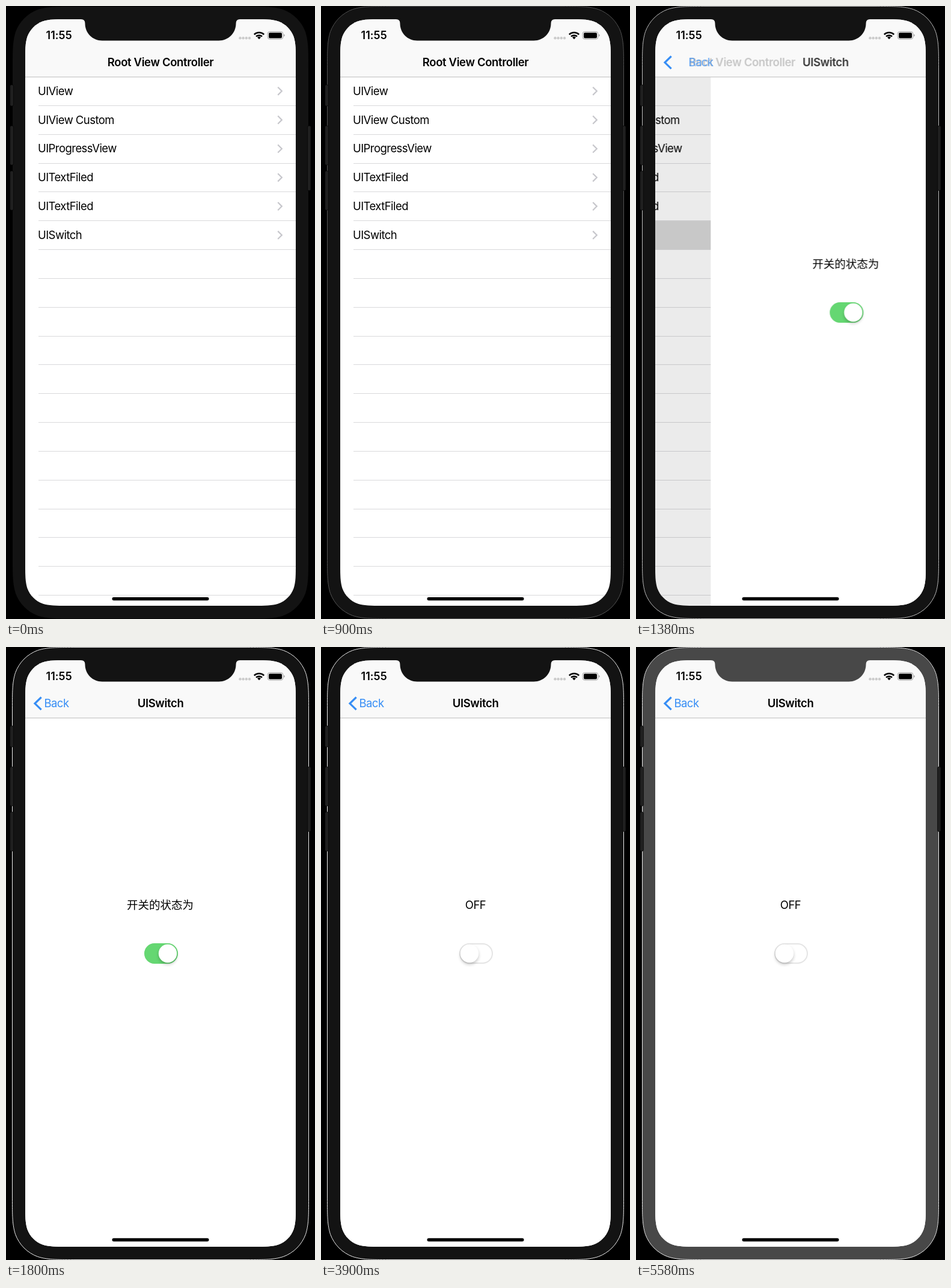
An HTML page for the animation above (5640 ms loop, 514 by 1018 pixels).

```html
<!DOCTYPE html>
<html lang="en">
<head>
<meta charset="utf-8">
<title>Switch demo</title>
<style>
  html, body { margin: 0; width: 100%; height: 100%; overflow: hidden; background: #000; }
  svg { display: block; width: 100vw; height: 100vh; }
  text { font: 18.5px Inter, Roboto, sans-serif; letter-spacing: -.56px; }
  .bold { font-weight: 600; letter-spacing: -.36px; }
  .mid { text-anchor: middle; }
  .clock { font-size: 18px; font-weight: 600; letter-spacing: .05px; }
  .cjk { font-family: "Noto Sans CJK SC", "Noto Sans CJK", sans-serif; letter-spacing: 0; }
  .blue { fill: #368df5; }
  .line { fill: none; stroke-linecap: square; }

  .anim { animation: 5.64s infinite both; }
  .step { animation-timing-function: step-end; }
  .push { animation-timing-function: cubic-bezier(.3, .6, .3, 1); }

  .bezel { animation-name: bezel; }
  .rim { animation-name: rim; animation-timing-function: linear; }
  .press { animation-name: press; }
  .list { animation-name: list; }
  .dim { animation-name: dim; }
  .page { animation-name: page; }
  .oldTitle { animation-name: oldTitle; }
  .newTitle { animation-name: newTitle; }
  .back { animation-name: back; }
  .arrow { animation-name: arrow; }
  .first { animation-name: first; }
  .on { animation-name: on; }
  .off { animation-name: off; }
  .fill { animation-name: fill; }
  .knob { animation-name: knob; filter: drop-shadow(0 3px 2.5px rgba(0, 0, 0, .22)); }

  @keyframes bezel { 0% { fill: #131313 } 97.87%, 100% { fill: #484848 } }
  @keyframes rim {
    0% { opacity: 0 } 15.96% { opacity: .35 } 24.47% { opacity: .8 } 31.9%, 100% { opacity: 1 }
  }
  @keyframes press { 0% { opacity: 0 } 19.15%, 100% { opacity: 1 } }

  /* page push: 1178 to 1678 ms */
  @keyframes list {
    0%, 20.88% { transform: none } 29.75%, 100% { transform: translateX(-135px) }
  }
  @keyframes dim { 0%, 20.88% { opacity: 0 } 29.75%, 100% { opacity: .1 } }
  @keyframes page {
    0%, 20.88% { transform: translateX(450px) } 29.75%, 100% { transform: none }
  }
  @keyframes oldTitle {
    0%, 20.88% { transform: none; opacity: 1 }
    29.75%, 100% { transform: translateX(-101px); opacity: 0 }
  }
  @keyframes newTitle {
    0%, 20.88% { transform: translateX(284px); opacity: 0 }
    29.75%, 100% { transform: none; opacity: 1 }
  }
  @keyframes back {
    0%, 20.88% { transform: translateX(116px); opacity: 0 }
    29.75%, 100% { transform: none; opacity: 1 }
  }
  @keyframes arrow { 0%, 20.88% { opacity: 0 } 24.5%, 100% { opacity: 1 } }

  /* switch: off at 2250, on at 2950, off at 3600 ms */
  @keyframes first { 0% { opacity: 1 } 39.89%, 100% { opacity: 0 } }
  @keyframes on { 0% { opacity: 0 } 52.3% { opacity: 1 } 63.83%, 100% { opacity: 0 } }
  @keyframes off {
    0% { opacity: 0 } 39.89% { opacity: 1 } 52.3% { opacity: 0 } 63.83%, 100% { opacity: 1 }
  }
  @keyframes fill {
    0%, 39.89% { opacity: 1 } 43.44%, 52.3% { opacity: 0 }
    55.85%, 63.83% { opacity: 1 } 67.38%, 100% { opacity: 0 }
  }
  @keyframes knob {
    0%, 39.89% { transform: translateX(22px) } 44.33%, 52.3% { transform: none }
    56.74%, 63.83% { transform: translateX(22px) } 68.26%, 100% { transform: none }
  }
</style>
</head>
<body>
<svg viewBox="0 0 514 1018" preserveAspectRatio="none">
  <clipPath id="screen"><path id="glass"/></clipPath>
  <rect width="514" height="1018"/>

  <path id="body" class="anim step bezel"/>
  <path id="rim" class="anim rim" fill="none" stroke="#eee"/>
  <g fill="#202020" stroke="#000" stroke-width=".6">
    <rect x="6.7" y="131" width="5.8" height="35" rx="2"/>
    <rect x="6.7" y="199" width="5.8" height="65" rx="2"/>
    <rect x="6.7" y="274" width="5.8" height="65" rx="2"/>
    <rect x="501.5" y="199" width="5.5" height="107.5" rx="2"/>
  </g>

  <g clip-path="url(#screen)">
    <rect x="32" y="22" width="450" height="974" fill="#fff"/>
    <g class="anim push list">
      <rect class="anim step press" x="32" y="356.7" width="450" height="47.8" fill="#d9d9d9"/>
      <g id="rows"></g>
    </g>
    <rect class="anim push dim" x="32" y="118" width="450" height="878"/>

    <g class="anim push page">
      <rect x="32" y="118" width="450" height="878" fill="#fff"/>
      <text class="mid cjk anim step first" x="256.5" y="435">开关的状态为</text>
      <text class="mid anim step on" x="257" y="434.7">ON</text>
      <text class="mid anim step off" x="257" y="434.7">OFF</text>
      <rect x="231" y="493" width="54" height="32" rx="16" fill="#fff" stroke="#e5e5e5" stroke-width="2"/>
      <rect class="anim fill" x="230" y="492" width="56" height="34" rx="17" fill="#65d772"/>
      <circle class="anim knob" cx="247" cy="509" r="15.2" fill="#fff"/>
    </g>

    <rect x="32" y="22" width="450" height="96" fill="#f9f9f9"/>
    <rect x="32" y="117.3" width="450" height="1.2" fill="#c6c6c6"/>
    <text class="bold mid anim push oldTitle" x="257" y="100.3">Root View Controller</text>
    <text class="bold mid anim push newTitle" x="257" y="100.3">UISwitch</text>
    <text class="blue anim push back" x="63.5" y="100.3">Back</text>
    <path class="line anim arrow" d="M57.5 84.5L48 93.8l9.5 9.3" stroke="#368df5" stroke-width="3.2"/>
  </g>

  <path class="anim step bezel" d="M125 21.5v.5q6.500 0 6.500 7c0 16 12.500 28.500 28.500 28.500h194c16 0 28.500-12.500 28.500-28.500q0-7 6.500-7v-.5z"/>

  <text class="clock" x="66.5" y="55.3">11:55</text>
  <g fill="#cbcbcb">
    <circle cx="389.5" cy="53.3" r="2.2"/>
    <circle cx="394.6" cy="53.3" r="2.2"/>
    <circle cx="399.8" cy="53.3" r="2.2"/>
    <circle cx="405" cy="53.3" r="2.2"/>
  </g>
  <g fill="none" stroke="#000" stroke-width="2.5">
    <path d="M412.8 47.3a11.6 11.6 0 0 1 16.4 0"/>
    <path d="M416 50.7a7.1 7.1 0 0 1 10 0"/>
  </g>
  <path d="M421 55.2l-2.9-2.9a4.1 4.1 0 0 1 5.8 0z"/>
  <rect x="435.2" y="42.5" width="25.6" height="12.6" rx="3.6" fill="none" stroke="#a0a0a0"/>
  <rect x="437" y="44.2" width="22" height="9.2" rx="2"/>
  <path d="M462.2 46.8q1.6.5 1.6 2t-1.6 2z" fill="#a0a0a0"/>
  <rect x="176.5" y="981.8" width="161" height="5.4" rx="2.7"/>
</svg>
<script>
  const byId = id => document.getElementById(id);

  // Rounded box whose corners ease gradually into the straight sides.
  function smoothBox(x, y, w, h, r) {
    const half = [[0, 1.529], [0, 1.088], [0, .868], [.075, .631], [.169, .373]];
    const corner = [...half, ...half.map(([a, b]) => [b, a]).reverse()];
    const place = (right, low) => corner.map(([a, b]) =>
      [right ? x + w - a * r : x + a * r, low ? y + h - b * r : y + b * r]);
    const sides = [place(0, 0), place(1, 0).reverse(), place(1, 1), place(0, 1).reverse()];
    return 'M' + sides.map(([start, ...curve]) => `${start}C${curve.join(' ')}`).join('L') + 'Z';
  }
  byId('body').setAttribute('d', smoothBox(11, 1, 492, 1016.5, 66.5));
  byId('rim').setAttribute('d', smoothBox(10.5, .5, 493, 1017, 67));
  byId('glass').setAttribute('d', smoothBox(32, 22, 450, 974, 46));

  const names = ['UIView', 'UIView Custom', 'UIProgressView', 'UITextFiled', 'UITextFiled', 'UISwitch'];
  const pitch = 47.83;
  let rows = '';
  for (let i = 0; i < 18; i++) {
    const y = 117.5 + i * pitch;
    rows += `<rect x="54" y="${Math.round(y + pitch - .4)}" width="428" height="1" fill="#d9d9db"/>`;
    if (names[i]) {
      rows += `<text x="53" y="${y + 30.3}">${names[i]}</text>
        <path class="line" d="M453 ${y + 18}l5.8 5.8l-5.8 5.8" stroke="#c7c7cc" stroke-width="2.2"/>`;
    }
  }
  byId('rows').innerHTML = rows;
</script>
</body>
</html>
```
